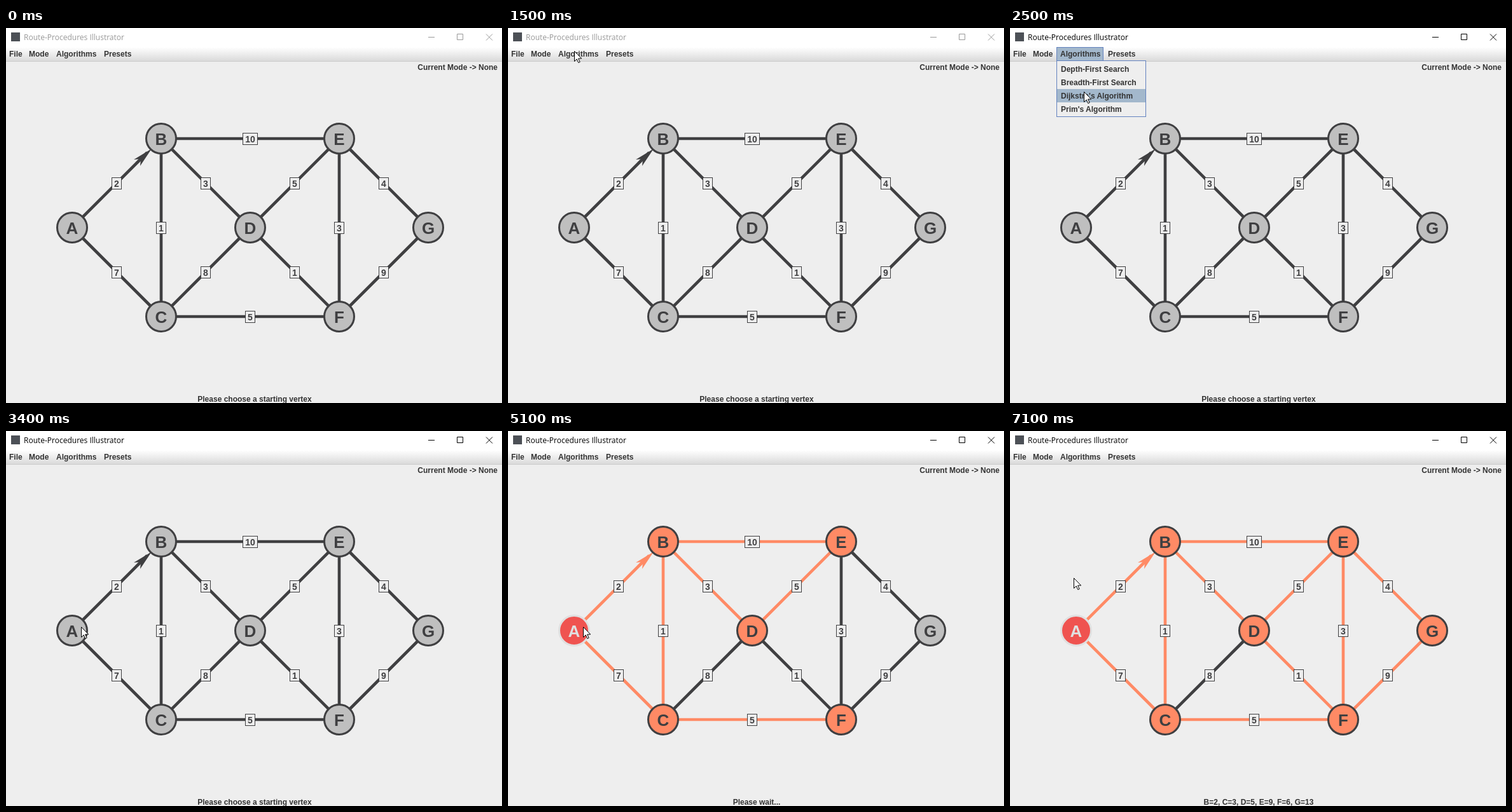
Animation of 780x590 px, one loop 7200 ms. Source, as an HTML page:

```html
<!DOCTYPE html>
<html lang="en">
<head>
<meta charset="utf-8">
<title>Route-Procedures Illustrator</title>
<style>
  html, body { margin: 0; width: 100%; height: 100%; overflow: hidden; background: #eee; }
  svg { display: block; width: 780px; height: 590px; }
  text { font: bold 12px "Liberation Sans", Arial, sans-serif; fill: #333; white-space: pre; }
  .frame { --ink: #999; }
  .frame.focus { --ink: #000; }
  .frame text { font: 12px "Open Sans", "Noto Sans", sans-serif; fill: var(--ink); }
  .frame path { fill: none; stroke: var(--ink); }
  .edge { stroke: #3f3f41; fill: #3f3f41; stroke-width: 4.6; }
  .edge polygon { stroke: none; }
  .edge.on { stroke: #ff8a65; fill: #ff8a65; }
  .node circle { fill: #bfbfbf; stroke: #3f3f41; stroke-width: 3; }
  .node text { font-size: 26px; fill: #3f3f41; text-anchor: middle; }
  .node.on circle { fill: #ff8a65; }
  .node.start circle { fill: #ef5350; stroke: #e0e0e0; }
  .node.start text { fill: #e0e0e0; }
  .weight rect { fill: #eee; stroke: #3f3f41; }
  .weight text { font-size: 14px; fill: #3f3f41; text-anchor: middle; }
  .hidden { display: none; }
</style>
</head>
<body>
<svg viewBox="0 0 780 590">
  <defs>
    <linearGradient id="bar" x2="0" y2="1">
      <stop stop-color="#fff"/><stop offset="1" stop-color="#dadada"/>
    </linearGradient>
  </defs>
  <rect width="780" height="590" fill="#eee"/>
  <rect width="780" height="30" fill="#fff"/>
  <rect x="8" y="7" width="14" height="14" fill="#4d5157"/>
  <g class="frame" id="frame">
    <text x="28" y="19">Route-Procedures Illustrator</text>
    <path d="M664 14.5h10M709.5 9.5h9v9h-9zM755 9.500l10 10M765 9.500l-10 10"/>
  </g>
  <rect y="30" width="780" height="22" fill="url(#bar)"/>
  <rect y="52" width="780" height="1" fill="#ccc"/>
  <rect id="tab" class="hidden" x="73.500" y="30.500" width="73" height="21" fill="#a3b8cc" stroke="#6382bf"/>
  <text x="5" y="45">File</text>
  <text x="36" y="45">Mode</text>
  <text x="79" y="45">Algorithms</text>
  <text x="154" y="45">Presets</text>
  <text x="773" y="66" text-anchor="end">Current Mode -&gt; None</text>
  <g id="edges"></g>
  <g id="nodes"></g>
  <g id="weights"></g>
  <text id="status" x="391" y="588" text-anchor="middle"></text>
  <g id="menu" class="hidden">
    <rect x="73.500" y="51.500" width="140" height="88" fill="#eee" stroke="#6382bf"/>
    <rect id="pick" x="74" width="139" height="21" fill="#a3b8cc"/>
    <text x="80" y="69">Depth-First Search</text>
    <text x="80" y="90">Breadth-First Search</text>
    <text x="80" y="111">Dijkstra's Algorithm</text>
    <text x="80" y="132">Prim's Algorithm</text>
  </g>
  <path id="cursor" d="M.5.5V16.500L4.200 12.900 6.800 18.600 9.200 17.500 6.600 12H11.700Z" fill="#fff" stroke="#000"/>
</svg>
<script>
const LOOP = 7200, FOCUS = 1600, PICK = 2700, START = 3700, FIRST = 3900, STEP = 200, DONE = 6100;

const points = {
  A: [104, 314], B: [244, 174], C: [244, 454], D: [384, 314],
  E: [524, 174], F: [524, 454], G: [664, 314]
};
// In the order Dijkstra relaxes them; CD never improves a distance.
const links = 'AB2 AC7 BC1 BD3 BE10 CF5 DE5 DF1 EF3 FG9 EG4 CD8'.split(' ');

// Pointer stops: time, x, y
const stops = [
  [1000, 190, -22], [1450, 104, 36], [1700, 104, 40], [1950, 111, 72], [2250, 111, 72],
  [2550, 116, 102], [2750, 116, 103], [3300, 118, 308], [6600, 118, 308], [7050, 100, 231], [LOOP, 100, 231]
];

const $ = id => document.getElementById(id);

function add(parent, tag, attrs = {}, label = '') {
  const el = document.createElementNS('http://www.w3.org/2000/svg', tag);
  for (const key in attrs) el.setAttribute(key, attrs[key]);
  el.textContent = label;
  return parent.appendChild(el);
}

const nodes = {};
for (const [name, [x, y]] of Object.entries(points)) {
  const g = add($('nodes'), 'g', { class: 'node' });
  add(g, 'circle', { cx: x, cy: y, r: 23.5 });
  add(g, 'text', { x, y: y + 10 }, name);
  nodes[name] = { el: g, at: Infinity };
}

const edges = links.map((link, i) => {
  const [from, to] = link, weight = link.slice(2);
  const [x1, y1] = points[from], [x2, y2] = points[to];
  const x = (x1 + x2) / 2, y = (y1 + y2) / 2, w = weight.length > 1 ? 23 : 15;
  const at = link === 'CD8' ? Infinity : FIRST + i * STEP;

  const el = add($('edges'), 'g', { class: 'edge' });
  const directed = link === 'AB2';
  add(el, 'line', { x1, y1, x2: directed ? 222 : x2, y2: directed ? 196 : y2 });
  if (directed) add(el, 'polygon', { points: '229,190 201,207 212,206 211,217' });

  const box = add($('weights'), 'g', { class: 'weight' });
  add(box, 'rect', { x: x - w / 2, y: y - 8.5, width: w, height: 18 });
  add(box, 'text', { x, y: y + 6 }, weight);

  nodes[to].at = Math.min(nodes[to].at, at);
  return { el, at };
});

function pointer(t) {
  const i = stops.findIndex(s => s[0] > t);
  if (i < 1) return null;
  const [t0, x0, y0] = stops[i - 1], [t1, x1, y1] = stops[i];
  const p = (t - t0) / (t1 - t0), k = p * p * (3 - 2 * p);
  return [x0 + (x1 - x0) * k, y0 + (y1 - y0) * k];
}

const show = (id, on) => $(id).classList.toggle('hidden', !on);

function draw() {
  const t = performance.now() % LOOP;
  const pos = pointer(t), open = t >= FOCUS && t < PICK;

  $('frame').classList.toggle('focus', t >= FOCUS);
  show('tab', open);
  show('menu', open);
  show('cursor', pos);
  if (pos) {
    const [x, y] = pos.map(Math.round);
    $('cursor').setAttribute('transform', `translate(${x} ${y})`);
    show('pick', y >= 54);
    $('pick').setAttribute('y', 54 + 21 * Math.floor((y - 54) / 21));
  }

  for (const { el, at } of [...edges, ...Object.values(nodes)]) el.classList.toggle('on', t >= at);
  nodes.A.el.classList.toggle('start', t >= START);
  $('status').textContent = t < START ? 'Please choose a starting vertex'
    : t < DONE ? 'Please wait...' : 'B=2, C=3, D=5, E=9, F=6, G=13';
  requestAnimationFrame(draw);
}
draw();
</script>
</body>
</html>
```
